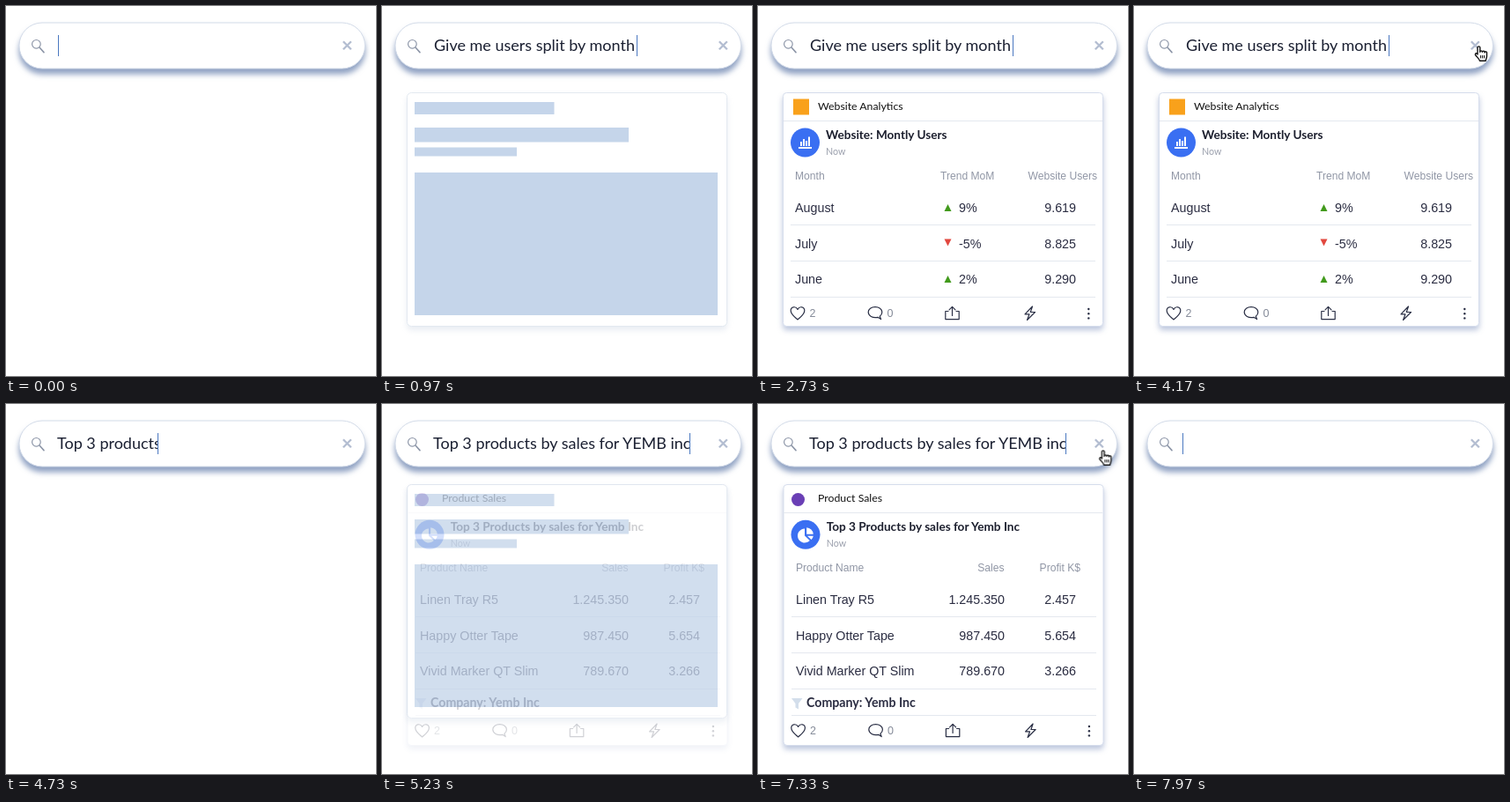
Write an HTML page that moves like this. It is 420x420 px and loops after 8000 ms.

```html
<!DOCTYPE html>
<html lang="en">
<head>
<meta charset="utf-8">
<title>Search to data cards</title>
<style>
  html, body { margin: 0; width: 100%; height: 100%; overflow: hidden; background: #fff; }
  .stage { position: relative; width: 420px; height: 420px; overflow: hidden; }
  svg { position: absolute; inset: 0; }

  .pill { fill: #fff; stroke: #d3dbe8; filter: drop-shadow(0 6px 3px rgba(70, 100, 155, .6)); }
  .card { fill: #fff; stroke: #d6ddec; filter: drop-shadow(0 4px 3px rgba(80, 105, 165, .38)); }
  .blank { fill: #fff; stroke: #e3e9f0; filter: drop-shadow(0 4px 3px rgba(120, 145, 180, .16)); }
  .bars { fill: #c5d5ea; }
  .rule { stroke: #e4e8ef; }
  .line { fill: none; stroke: #2a2f45; stroke-width: 1.2; stroke-linecap: round; stroke-linejoin: round; }

  .query, .app, .title, .now, .filter { font-family: Lato, sans-serif; }
  .app { font-size: 12.3px; fill: #111; }
  .title { font-size: 13.6px; font-weight: 700; fill: #1c1f2e; }
  .now { font-size: 10.7px; fill: #9a9fac; }
  .filter { font-size: 14.2px; font-weight: 700; fill: #2b2d42; }
  .head, .cell, .count { font-family: "Liberation Sans", Arial, sans-serif; }
  .head { font-size: 12.1px; fill: #9096a5; }
  .cell { font-size: 14.3px; fill: #2b2d42; }
  .count { font-size: 12.5px; fill: #858b99; }
  .end { text-anchor: end; }

  .query {
    position: absolute; top: 33px; height: 24px; line-height: 22px;
    font-size: 18px; color: #1b2032; white-space: pre; overflow: hidden;
    border-right: 1.5px solid #4a78c0;
  }
  .q1 { left: 58px; text-indent: 1px; }
  .q2 { left: 54px; text-indent: 4px; }

  /* One 8 s timeline: 1% = 80 ms */
  .q1, .q2, .wait1, .wait2, .result1, .result2, .hand { animation: 8s linear infinite both; }
  .q1 { animation-name: type1; }
  .q2 { animation-name: type2; }
  .wait1 { animation-name: wait1; }
  .wait2 { animation-name: wait2; }
  .result1 { animation-name: result1; }
  .result2 { animation-name: result2; }
  .hand { animation-name: hand; }

  @keyframes type1 {
    0% { width: 1px; opacity: 1; }
    11%, 53.74% { width: 231px; opacity: 1; }
    53.75%, 100% { width: 231px; opacity: 0; }
  }
  @keyframes type2 {
    0%, 53.74% { width: 1px; opacity: 0; }
    53.75%, 57.5% { width: 1px; opacity: 1; }
    61.6%, 95.86% { width: 295px; opacity: 1; }
    95.87%, 100% { width: 1px; opacity: 1; }
  }
  @keyframes wait1 {
    0%, 8.5% { opacity: 0; }
    11.2%, 30% { opacity: 1; }
    30.01%, 100% { opacity: 0; }
  }
  @keyframes wait2 {
    0%, 59.5% { opacity: 0; }
    62%, 71.8% { opacity: 1; }
    71.81%, 100% { opacity: 0; }
  }
  @keyframes result1 {
    0%, 21.25% { opacity: 0; }
    30%, 53.75% { opacity: 1; }
    56.25%, 100% { opacity: 0; }
  }
  @keyframes result2 {
    0%, 63.6% { opacity: 0; }
    71.8%, 95.87% { opacity: 1; }
    98.4%, 100% { opacity: 0; }
  }
  @keyframes hand {
    0%, 41.2% { opacity: 0; transform: translate(398px, 300px); animation-timing-function: ease-in-out; }
    50.6%, 53.5% { opacity: 1; transform: translate(386px, 45px); }
    55.6% { opacity: 0; transform: translate(422px, 60px); }
    55.61%, 83.3% { opacity: 0; transform: translate(398px, 300px); animation-timing-function: ease-in-out; }
    92.75%, 95.6% { opacity: 1; transform: translate(386px, 45px); }
    97.75% { opacity: 0; transform: translate(422px, 60px); }
    100% { opacity: 0; transform: translate(398px, 300px); }
  }
</style>
</head>
<body>
<div class="stage">
  <svg width="420" height="420" viewBox="0 0 420 420">
    <defs>
      <g id="skeleton">
        <rect class="blank" x="28.5" y="98.5" width="363" height="265" rx="5"/>
        <g class="bars">
          <rect x="37" y="109" width="158.5" height="14"/>
          <rect x="37" y="138" width="243" height="16.5"/>
          <rect x="37" y="160.5" width="116" height="10"/>
          <rect x="37" y="189" width="344" height="162"/>
        </g>
      </g>
      <g id="actions">
        <g class="line">
          <path d="M45 356C41 352.5 37.2 350 37.2 345.8C37.2 341 43 340.4 45 344.4C47 340.4 52.8 341 52.8 345.8C52.8 350 49 352.5 45 356Z"/>
          <path d="M136 353.3C130 354.6 125.2 351.5 125.2 347.6C125.2 344 128.7 341.7 133 341.7S140.8 344 140.8 347.6C140.8 349.7 139.8 351.3 138.3 352.3L139.6 355.6Z"/>
          <path d="M216 346.5H212.8V355.6H228.2V346.5H225M220.5 351.5V341.5M217 344.8L220.5 341.3L224 344.8"/>
          <path d="M311.5 341L303 349.8H308L305.5 356.5L314.5 347.5H309.3Z"/>
        </g>
        <g fill="#2a2f45">
          <circle cx="375.3" cy="344" r="1.2"/>
          <circle cx="375.3" cy="349.2" r="1.2"/>
          <circle cx="375.3" cy="354.4" r="1.2"/>
        </g>
        <text class="count" x="58.5" y="353">2</text>
        <text class="count" x="146.5" y="353">0</text>
      </g>
      <path id="up" d="M-4 4H4L0 -4Z" fill="#429a1c"/>
      <path id="down" d="M-4 -4H4L0 4Z" fill="#e2483f"/>
    </defs>

    <rect class="pill" x="15" y="19" width="392.5" height="52" rx="26"/>
    <g fill="none" stroke="#8d96a8" stroke-linecap="round">
      <circle cx="34.4" cy="43.3" r="4.8" stroke-width="1.2"/>
      <path d="M38 47L43 52.6" stroke-width="1.6"/>
    </g>
    <path d="M382.8 40.2L391.8 49.2M391.8 40.2L382.8 49.2" stroke="#b3bdd1" stroke-width="2.3"/>

    <use class="wait1" href="#skeleton"/>
    <g class="wait2"><use href="#skeleton" y="-7"/></g>

    <g class="result1">
      <rect class="card" x="28.5" y="98.5" width="363" height="265" rx="4"/>
      <rect x="40" y="105.5" width="18" height="18" fill="#f9a11b"/>
      <text class="app" x="68" y="118">Website Analytics</text>
      <path class="rule" d="M29 130.5H391"/>
      <circle cx="53.5" cy="155" r="16.5" fill="#3a6ff2"/>
      <path d="M46 161H61M49 159V154M52 159V151M55 159V153M58 159V148.5" stroke="#fff" stroke-width="2"/>
      <text class="title" x="77" y="151">Website: Montly Users</text>
      <text class="now" x="77" y="168.5">Now</text>
      <text class="head" x="42" y="197">Month</text>
      <text class="head" x="207" y="197">Trend MoM</text>
      <text class="head end" x="385" y="197">Website Users</text>
      <g class="cell">
        <text x="42" y="234">August</text><text x="228" y="234">9%</text><text class="end" x="361" y="234">9.619</text>
        <text x="42" y="274.5">July</text><text x="228" y="274.5">-5%</text><text class="end" x="361" y="274.5">8.825</text>
        <text x="42" y="315">June</text><text x="228" y="315">2%</text><text class="end" x="361" y="315">9.290</text>
      </g>
      <use href="#up" x="215.5" y="229"/>
      <use href="#down" x="215.5" y="268.5"/>
      <use href="#up" x="215.5" y="310"/>
      <path class="rule" d="M37 248.5H383M37 289.5H383M37 330.5H383"/>
      <use href="#actions"/>
    </g>

    <g class="result2">
      <rect class="card" x="29" y="91.5" width="363" height="296" rx="4"/>
      <circle cx="45.5" cy="108.5" r="7.5" fill="#6a3fb5"/>
      <text class="app" x="68" y="111">Product Sales</text>
      <path class="rule" d="M29 123.5H391"/>
      <circle cx="54" cy="148.3" r="16.5" fill="#3a6ff2"/>
      <path d="M53 141.5V149.5L58.8 155A8 8 0 1 1 53 141.5ZM55.2 140.3A8 8 0 0 1 62.8 147.7H55.2ZM56 149.7H62.8A8 8 0 0 1 60.5 154Z" fill="#fff"/>
      <text class="title" x="77.7" y="144">Top 3 Products by sales for Yemb Inc</text>
      <text class="now" x="77.7" y="161.5">Now</text>
      <text class="head" x="43" y="190">Product Name</text>
      <text class="head end" x="279.5" y="190">Sales</text>
      <text class="head end" x="366" y="190">Profit K$</text>
      <g class="cell">
        <text x="43" y="227">Linen Tray R5</text><text class="end" x="280" y="227">1.245.350</text><text class="end" x="361" y="227">2.457</text>
        <text x="43" y="267.5">Happy Otter Tape</text><text class="end" x="280" y="267.5">987.450</text><text class="end" x="361" y="267.5">5.654</text>
        <text x="43" y="308">Vivid Marker QT Slim</text><text class="end" x="280" y="308">789.670</text><text class="end" x="361" y="308">3.266</text>
      </g>
      <path class="rule" d="M38 241.5H384M38 282.5H384M38 323.5H384M38 353.5H384"/>
      <path d="M38 334H50.5L46 340V346.5L42.5 344.5V340Z" fill="#d3deeb"/>
      <text class="filter" x="55" y="344">Company: Yemb Inc</text>
      <use href="#actions" x="0.6" y="22"/>
    </g>

    <g class="hand">
      <path d="M4 10V2.3a1.4 1.4 0 0 1 2.8 0V7.2a1.3 1.3 0 0 1 2.6 0a1.3 1.3 0 0 1 2.6 .6a1.2 1.2 0 0 1 2.5 .6V12c0 2-1 3-1.3 5.2H6.4C5.8 14.7 3 12.7 1.4 10.3a1.4 1.4 0 0 1 2.6-.9Z"
        fill="#fff" stroke="#111" stroke-width="1.4" stroke-linejoin="round"/>
      <path d="M7.6 11V14.4M9.6 11V14.4M11.6 11V14.4" stroke="#111"/>
    </g>
  </svg>

  <div class="query q1">Give me users split by month </div>
  <div class="query q2">Top 3 products by sales for YEMB inc</div>
</div>
</body>
</html>
```
